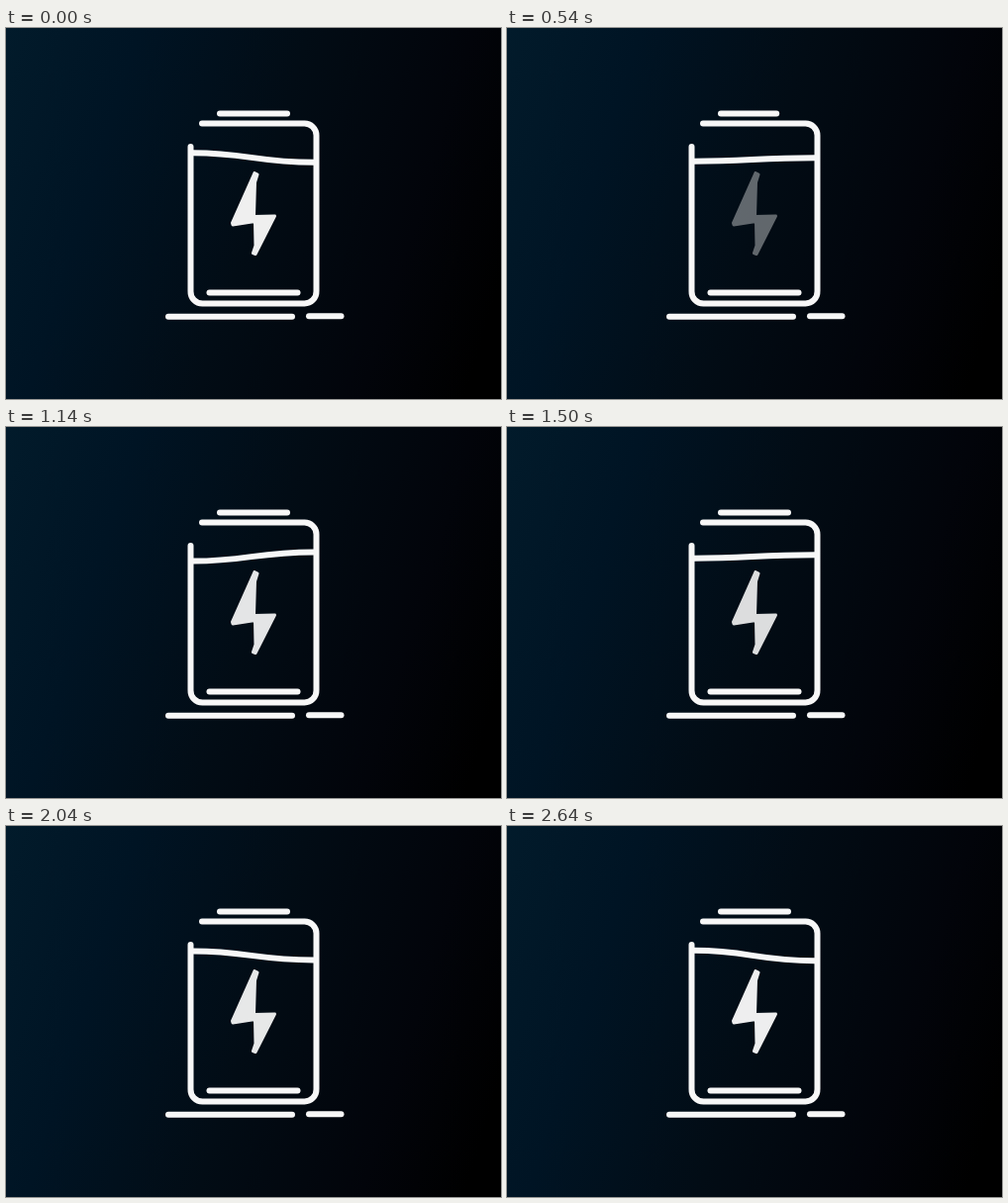
Recreate the animation shown at these times as an HTML page. Size 500 by 375 pixels, loop 2700 ms.

```html
<!DOCTYPE html>
<html>
<head>
<meta charset="utf-8">
<style>
  html, body { margin: 0; width: 100%; height: 100%; overflow: hidden; background: #000; }
  svg { display: block; width: 500px; height: 375px;
    background: linear-gradient(107deg, #021b2b, #001424 22%, #020c15 50%, #02040a 77%, #000 94%); }
  path { fill: none; stroke: #f7f7f7; stroke-width: 6; stroke-linecap: round; stroke-linejoin: round; }
  #level { stroke-linecap: butt; }
  #bolt { fill: #f7f7f7; stroke-width: 3; }
</style>
</head>
<body>
<svg viewBox="0 0 500 375">
  <path id="level"/>
  <path id="bolt" d="M251 146.5L254 148L251.500 156L250.500 190.500L271.500 190L252 228.500L249.500 227.500L252 220L251.500 195.500L229 199L228.500 197Z"/>
  <path id="shell" d="M186.500 62V266A12 12 0 0 0 198.500 278.500H301A12 12 0 0 0 313.500 266V108.500A12 12 0 0 0 301 96.500H198"/>
  <path id="cap" d="M216 86.500H284"/>
  <path id="bar" d="M205.500 267.500H294.500"/>
  <path id="groundLong" d="M164 291.800H289"/>
  <path id="groundShort" d="M306 291.300H338.500"/>
</svg>
<script>
const LOOP = 2700, STEP = 60;
const el = id => document.getElementById(id);
const progress = (t, from, to) => Math.min(1, Math.max(0, (t - from) / (to - from)));
const easeOut = u => 1 - (1 - u) ** 2;
const smooth = u => u * u * (3 - 2 * u);
const mix = (a, b, u) => a + (b - a) * u;

function trim(id, start, end) {
  const path = el(id), length = path.getTotalLength();
  const visible = (end - start) * length;
  path.style.visibility = visible > .1 ? "visible" : "hidden";
  path.style.strokeDasharray = `${visible} ${length * 2}`;
  path.style.strokeDashoffset = -start * length;
}

// The liquid rises, then sways around its resting height
function drawLevel(t) {
  const height = 131 + 89 * (1 - easeOut(progress(t, 200, 600)));
  const sway = -12 * Math.sin(Math.PI * (t - 1640) / 1500);
  const tilt = mix(3.5, sway, smooth(progress(t, 700, 1300))) / 2;
  const left = height + tilt, right = height - tilt;
  el("level").setAttribute("d", `M189 ${left}C243 ${left} 253 ${right} 311 ${right}`);
  el("level").style.opacity = progress(t, 220, 410);
}

// The bolt fades in and keeps pulsing gently
function drawBolt(t) {
  const fade = 1 - Math.exp(-Math.max(0, t - 420) / 210);
  const pulse = .93 + .04 * Math.cos(2 * Math.PI * (t - 1860) / 840);
  el("bolt").style.opacity = fade * pulse;
}

function draw(now) {
  let t = Math.floor(now % LOOP / STEP) * STEP;
  if (t < STEP) t = LOOP;

  const hiddenStart = 58 / el("shell").getTotalLength();
  trim("shell", hiddenStart * smooth(progress(t, 50, 520)), easeOut(progress(t, 40, 520)));
  trim("groundLong", 0, easeOut(progress(t, 40, 330)));
  trim("groundShort", 0, easeOut(progress(t, 160, 350)));
  trim("bar", 0, easeOut(progress(t, 140, 460)));
  trim("cap", 0, easeOut(progress(t, 400, 640)));
  drawLevel(t);
  drawBolt(t);
  requestAnimationFrame(() => draw(performance.now() - began));
}

const began = performance.now();
draw(0);
</script>
</body>
</html>
```
